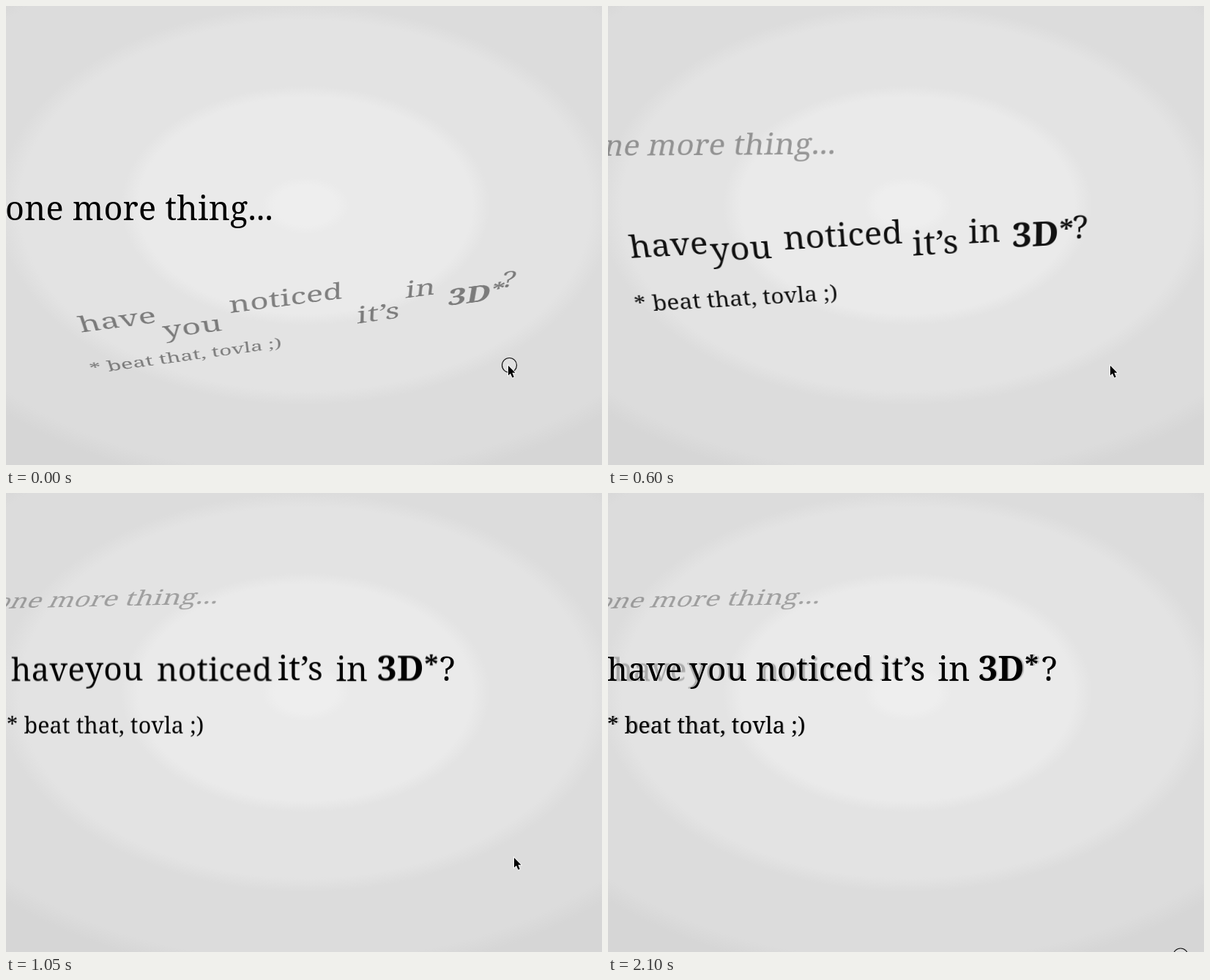
An HTML page that plays this animation: 814 by 628 pixels, repeating every 2.2 s.

```html
<!DOCTYPE html>
<html lang="en">
<head>
<meta charset="utf-8">
<title>One more thing</title>
<style>
  html, body { margin: 0; width: 100%; height: 100%; overflow: hidden; }
  #stage {
    position: relative; width: 814px; height: 628px; overflow: hidden;
    background: radial-gradient(600px 390px at 409px 273px,
      #eee 7%, #eaeaea 10%, #eaeaea 38%, #e3e3e3 42%,
      #e3e3e3 65%, #dcdcdc 70%, #dcdcdc 94%, #d6d6d6 100%);
    font-family: "Noto Serif", serif;
  }
  #camera { position: absolute; left: 450px; top: 275px; perspective: 1000px; perspective-origin: 0 0; }
  #camera, #world, .slide { width: 0; height: 0; }
  #world, .slide { position: absolute; left: 0; top: 0; transform-style: preserve-3d; transform-origin: 0 0; }
  .word {
    position: absolute; line-height: 0; white-space: pre;
    letter-spacing: .005em; transform-origin: 0 0;
  }
  svg { position: absolute; left: 0; top: 0; }
</style>
</head>
<body>
<div id="stage">
  <div id="camera"><div id="world">
    <div class="slide" id="intro"></div>
    <div class="slide" id="tilted"></div>
  </div></div>
  <svg width="814" height="628">
    <circle id="ring" r="10" fill="#fff" fill-opacity=".15" stroke="#111" stroke-width="1.2"/>
    <path id="pointer" d="M0 0V13.5L3 10.7L5.5 16.5L7.8 15.5L5.4 9.8H9.5Z"
      fill="#000" stroke="#fff" stroke-width="1.6" paint-order="stroke"/>
  </svg>
</div>
<script>
const $ = id => document.getElementById(id);
const LOOP = 2200, STEP = 150;
const clamp = v => Math.max(0, Math.min(1, v));

function addWord(slide, { text, x, y = -18, size = 45, weight = 400 }) {
  const el = document.createElement('span');
  el.className = 'word';
  el.textContent = text;
  // 0.388em is the distance from the middle of the line to its baseline
  el.style.cssText = `left:${x}px;top:${y - size * .388}px;font-size:${size}px;font-weight:${weight}`;
  slide.append(el);
  return el;
}

// depth is how far a word floats from its slide before it settles
const words = [
  { text: 'have', x: -451, depth: -20, size: 44 },
  { text: 'you', x: -339, depth: 10, size: 44 },
  { text: 'noticed', x: -248.5, depth: -20 },
  { text: 'it’s', x: -77, depth: 30 },
  { text: 'in', x: .5, depth: -5 },
  { text: '3D', x: 56, depth: 20, size: 47, weight: 700 },
  { text: '*', x: 119, y: -25, depth: 20, size: 38, weight: 700 },
  { text: '?', x: 142, depth: 0 },
  { text: '* beat that, tovla ;)', x: -451, y: 54, depth: -5, size: 30.5 }
];

addWord($('intro'), { text: 'one more thing...', x: -451, y: 18 });
const ghosts = words.map(word => {
  const el = addWord($('tilted'), word);
  el.style.color = 'rgba(0,0,0,.25)';
  el.style.transform = `translateZ(${word.depth * .9}px)`;
  return el;
});
const floating = words.map(word => addWord($('tilted'), word));

const pointerPath = [[900, 686, 492], [1050, 694, 499], [1200, 703, 512], [1350, 707, 570], [1500, 736, 624]];

function draw(t) {
  const move = (1 - Math.cos(Math.PI * clamp((t - 60) / 990))) / 2;
  const rest = 1 - move;
  const hover = (1 - clamp((t - 1025) / 475)) ** 2;

  $('world').style.transform =
    `rotateY(${-10 * move}deg) rotateX(${40 * move}deg) translate3d(${-100 * move}px,${-150 * move}px,${50 * move}px)`;
  $('tilted').style.transform =
    `translate3d(100px,${150 - 2 * rest}px,${-50 - 8 * rest}px) rotateX(-40deg) rotateY(10deg)`;
  $('intro').style.color = `rgba(0,0,0,${Math.max(.3, 1 - t * .00107)})`;
  $('tilted').style.color = `rgba(0,0,0,${Math.min(1, .46 + t * .00078)})`;

  words.forEach((word, i) => {
    floating[i].style.transform = `translateZ(${word.depth * hover}px)`;
    ghosts[i].style.visibility = t >= 1200 ? 'visible' : 'hidden';
  });

  const [, x, y] = pointerPath.find(([until]) => t <= until) || [0, -50, -50];
  $('pointer').setAttribute('transform', `translate(${x} ${y})`);
  const click = t < 150 ? [687.5, 491.5] : t >= 2100 ? [782, 633] : [-50, -50];
  $('ring').setAttribute('transform', `translate(${click})`);
}

function tick() {
  draw(Math.floor(performance.now() % LOOP / STEP) * STEP);
  requestAnimationFrame(tick);
}
tick();
</script>
</body>
</html>
```
